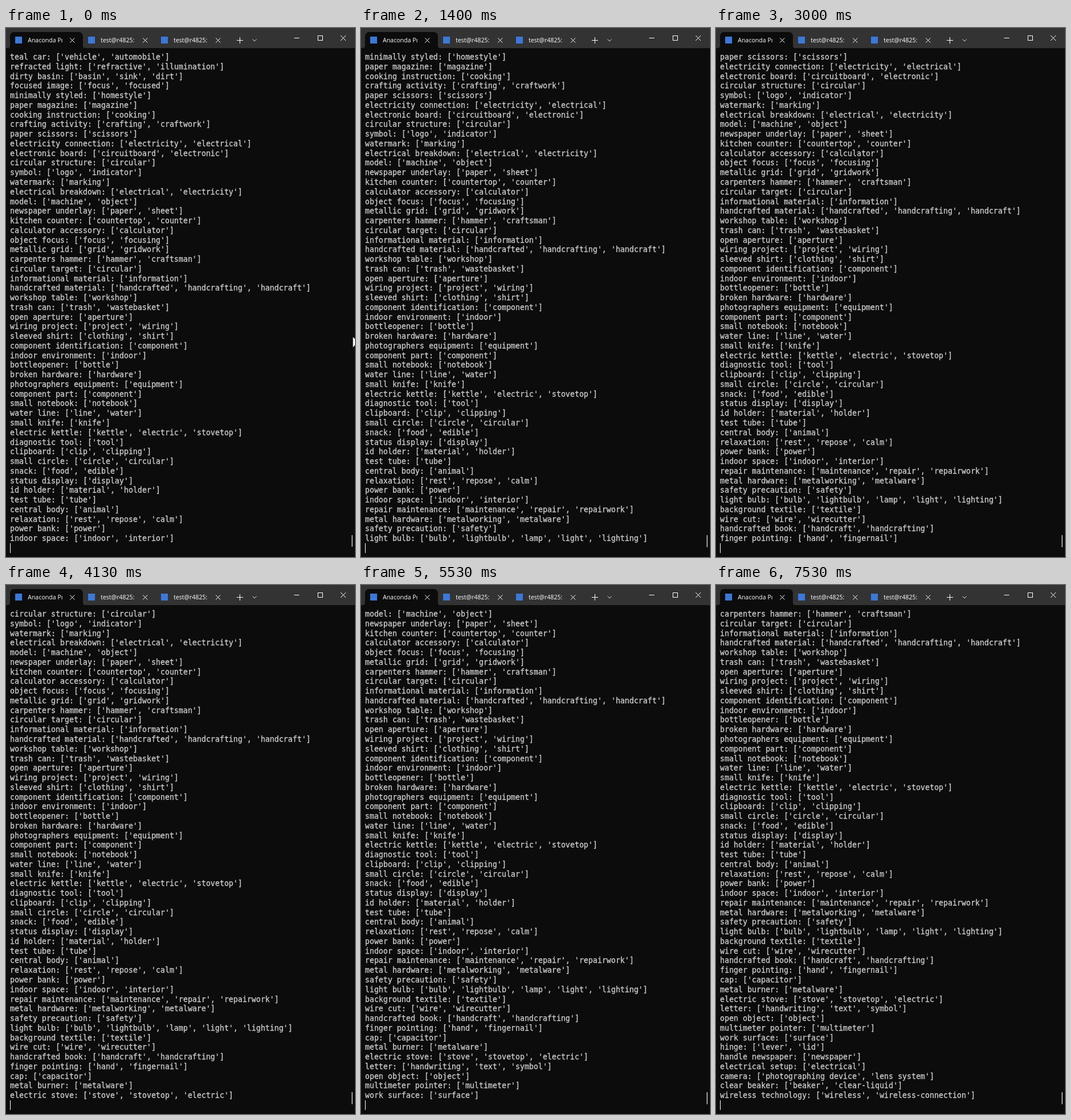
Recreate the animation shown at these times as an HTML page with a canvas. Size 608 by 921 pixels, loop 7800 ms.

```html
<!DOCTYPE html>
<html lang="en">
<head>
<meta charset="utf-8">
<title>Terminal</title>
<style>
  html, body { margin: 0; width: 100%; height: 100%; overflow: hidden; background: #0c0c0c; }
  canvas { display: block; width: 608px; height: 921px; }
</style>
</head>
<body>
<canvas id="stage" width="608" height="921"></canvas>
<script>
const ctx = document.getElementById('stage').getContext('2d');
const LOOP = 7800, ROWS = 51, PITCH = 16.76;

// label:tag,tag
const log = `teal car:vehicle,automobile
refracted light:refractive,illumination
dirty basin:basin,sink,dirt
focused image:focus,focused
minimally styled:homestyle
paper magazine:magazine
cooking instruction:cooking
crafting activity:crafting,craftwork
paper scissors:scissors
electricity connection:electricity,electrical
electronic board:circuitboard,electronic
circular structure:circular
symbol:logo,indicator
watermark:marking
electrical breakdown:electrical,electricity
model:machine,object
newspaper underlay:paper,sheet
kitchen counter:countertop,counter
calculator accessory:calculator
object focus:focus,focusing
metallic grid:grid,gridwork
carpenters hammer:hammer,craftsman
circular target:circular
informational material:information
handcrafted material:handcrafted,handcrafting,handcraft
workshop table:workshop
trash can:trash,wastebasket
open aperture:aperture
wiring project:project,wiring
sleeved shirt:clothing,shirt
component identification:component
indoor environment:indoor
bottleopener:bottle
broken hardware:hardware
photographers equipment:equipment
component part:component
small notebook:notebook
water line:line,water
small knife:knife
electric kettle:kettle,electric,stovetop
diagnostic tool:tool
clipboard:clip,clipping
small circle:circle,circular
snack:food,edible
status display:display
id holder:material,holder
test tube:tube
central body:animal
relaxation:rest,repose,calm
power bank:power
indoor space:indoor,interior
repair maintenance:maintenance,repair,repairwork
metal hardware:metalworking,metalware
safety precaution:safety
light bulb:bulb,lightbulb,lamp,light,lighting
background textile:textile
wire cut:wire,wirecutter
handcrafted book:handcraft,handcrafting
finger pointing:hand,fingernail
cap:capacitor
metal burner:metalware
electric stove:stove,stovetop,electric
letter:handwriting,text,symbol
open object:object
multimeter pointer:multimeter
work surface:surface
hinge:lever,lid
handle newspaper:newspaper
electrical setup:electrical
camera:photographing device,lens system
clear beaker:beaker,clear-liquid
wireless technology:wireless,wireless-connection`.split('\n').map(entry => {
  const [label, tags] = entry.split(':');
  return `${label}: [${tags.split(',').map(tag => `'${tag}'`).join(', ')}]`;
});

// Times at which a new line is printed
const prints = [70, 530, 930, 1400, 1730, 2130, 2600, 3000, 3330, 3670, 4070,
  4470, 4870, 5200, 5530, 5870, 6130, 6400, 6800, 7200, 7530];
// Brief spells without a caret
const caretGaps = [[1730, 1800], [4070, 4130]];

function box(x, y, w, h, color) {
  ctx.fillStyle = color;
  ctx.fillRect(x, y, w, h);
}

function line(points, color = '#fff') {
  ctx.strokeStyle = color;
  ctx.lineWidth = 1;
  ctx.beginPath();
  points.forEach(([x, y], i) => i ? ctx.lineTo(x, y) : ctx.moveTo(x, y));
  ctx.stroke();
}

function cross(x, y, r) {
  line([[x - r, y - r], [x + r, y + r]]);
  line([[x - r, y + r], [x + r, y - r]]);
}

function tab(x, title) {
  box(x + 9, 15, 12, 12, '#3b78d8');
  ctx.save();
  ctx.beginPath();
  ctx.rect(x + 30, 8, 61, 26);
  ctx.clip();
  ctx.font = '10.5px "Open Sans", sans-serif';
  ctx.fillStyle = '#fff';
  ctx.fillText(title, x + 31, 25);
  ctx.restore();
  cross(x + 108.5, 21.5, 4);
}

function titleBar() {
  box(0, 0, 608, 35, '#333333');
  ctx.fillStyle = '#0c0c0c';
  ctx.beginPath();
  ctx.moveTo(3, 35);
  ctx.quadraticCurveTo(7, 35, 7, 31);
  ctx.arcTo(7, 7, 14, 7, 7);
  ctx.arcTo(134, 7, 134, 14, 7);
  ctx.lineTo(134, 31);
  ctx.quadraticCurveTo(134, 35, 138, 35);
  ctx.fill();

  tab(7, 'Anaconda Prompt');
  tab(134, 'test@r4825:');
  tab(261, 'test@r4825:');

  line([[402, 21.5], [413, 21.5]]);
  line([[407.5, 16], [407.5, 27]]);
  line([[429.5, 19.5], [433, 23], [436.5, 19.5]], '#ddd');
  line([[502, 17.5], [511, 17.5]]);
  ctx.strokeRect(543.5, 13.5, 8, 8);
  cross(587.5, 17.5, 4.5);
}

function terminal(top) {
  ctx.font = '13.2px "DejaVu Sans Mono", monospace';
  ctx.fillStyle = ctx.strokeStyle = '#cccccc';
  ctx.lineWidth = 0.3;
  for (let i = 0; i < ROWS; i++) {
    const y = Math.round(55.1 + PITCH * i);
    ctx.fillText(log[top + i], 7, y);
    ctx.strokeText(log[top + i], 7, y);
  }
}

// Arrow pointer, cut off by the right edge
function pointer() {
  ctx.fillStyle = '#fff';
  ctx.beginPath();
  ctx.moveTo(604.5, 538);
  ctx.lineTo(608, 541.5);
  ctx.lineTo(608, 552);
  ctx.lineTo(604.5, 556);
  ctx.fill();
}

function draw(t) {
  box(0, 0, 608, 921, '#0c0c0c');
  titleBar();
  terminal(prints.filter(p => p <= t).length);
  if (!caretGaps.some(([a, b]) => t >= a && t < b)) box(7, 897, 1, 17, '#fff');
  box(602, 883, 2, t < 600 ? 20 : 21, '#9a9a9a');
  if (t < 70) pointer();
}

const start = performance.now();
function tick() {
  draw((performance.now() - start) % LOOP);
  requestAnimationFrame(tick);
}
tick();
</script>
</body>
</html>
```
